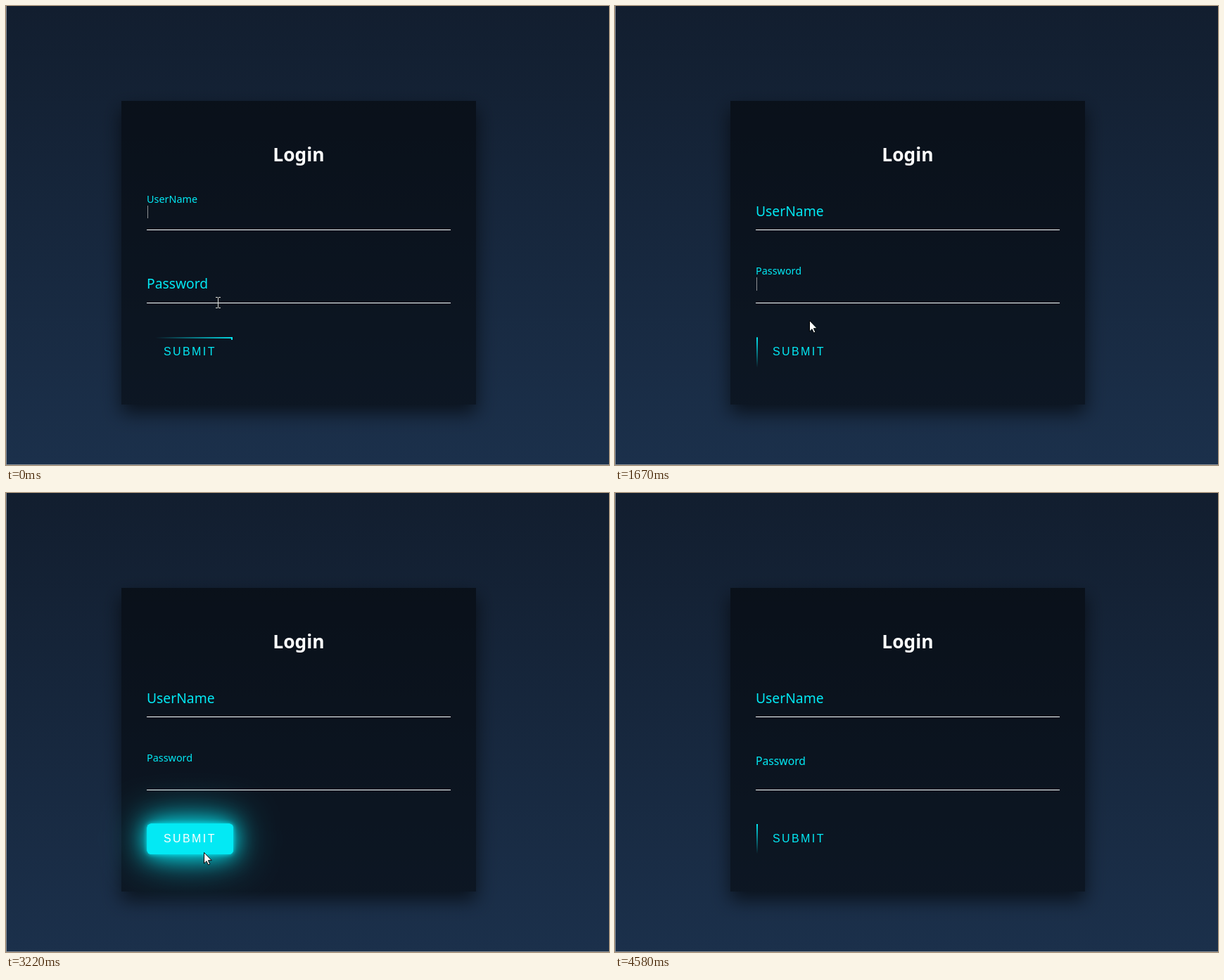
These frames come from a looping animation (857x653 px, 4.68 s). An HTML page with a canvas:

```html
<!DOCTYPE html>
<html lang="en">
<head>
<meta charset="utf-8">
<title>Login</title>
<style>
html, body { margin: 0; width: 100%; height: 100%; overflow: hidden; background: #121e2f; }
canvas { display: block; }
</style>
</head>
<body>
<canvas id="stage" width="857" height="653"></canvas>
<script>
const c = document.getElementById('stage').getContext('2d');
const LOOP = 4680, CYAN = '#03e9f4';
const BOX = [164, 135, 504, 432];
const BX = 201, BY = 471, BW = 121, BH = 43;

// The picture is refreshed only at these moments (ms).
const TICKS = [0, 120, 250, 400, 550, 690, 820, 970, 1120, 1270, 1400, 1550, 1670, 1820,
  1940, 2490, 3070, 3220, 3340, 3490, 3620, 3770, 3920, 4070, 4220, 4340, 4460, 4580];

// Pointer: [from, shape, x, y]
const POINTER = [
  [0, 'beam', 301, 422], [120, 'beam', 301, 416], [1670, 'arrow', 276, 447],
  [1820, 'arrow', 262, 508], [3220, 'arrow', 281, 511], [3340, 'arrow', 756, 563],
  [3770, 'arrow', 762, 592], [3920, 'arrow', 786, 639], [4070, 'none', 0, 0]
];

// Password caret: [on, off]
const BLINKS = [[400, 970], [1550, 1940], [2490, 3070], [3620, 4070]];

const clamp = v => Math.min(1, Math.max(0, v));

// cubic-bezier(.25, .1, .25, 1)
function ease(x) {
  let lo = 0, hi = 1, s;
  for (let i = 0; i < 24; i++) {
    s = (lo + hi) / 2;
    const bx = .75 * s * (1 - s) * (1 - s) + .75 * s * s * (1 - s) + s * s * s;
    if (bx < x) lo = s; else hi = s;
  }
  return .3 * s * (1 - s) * (1 - s) + 3 * s * s * (1 - s) + s * s * s;
}

const slide = (t, start) => ease(clamp((t - start) / 640));

function rect(color, x, y, w, h) {
  c.fillStyle = color;
  c.fillRect(x, y, w, h);
}

function text(str, font, color, x, y, spacing = 0) {
  c.font = font;
  c.fillStyle = color;
  c.letterSpacing = spacing + 'px';
  c.fillText(str, x, y);
}

function backdrop() {
  const g = c.createLinearGradient(0, 0, 0, 653);
  g.addColorStop(0, '#121e2f');
  g.addColorStop(1, '#1b304b');
  rect(g, 0, 0, 857, 653);

  c.save();
  c.beginPath();
  c.rect(0, 0, 857, 653);
  c.rect(...BOX);
  c.clip('evenodd');
  c.shadowColor = 'rgba(0,0,0,.6)';
  c.shadowBlur = 25;
  c.shadowOffsetY = 12;
  rect('#000', ...BOX);
  c.restore();
  rect('rgba(0,0,0,.5)', ...BOX);

  rect('#8b9097', 0, 0, 1, 653);
  rect('#8b9097', 0, 652, 857, 1);
}

// up: 0 = resting on the line, 1 = floating above it
function label(str, base, up) {
  text(str, `${19.3 - 4.9 * up}px "Noto Sans", "Open Sans", sans-serif`, CYAN, 200, base - 19.3 * up);
}

// One runner: a fading bar whose head moves from (x0, y0) along (dx, dy) past the button
function runner(phase, x0, y0, dx, dy) {
  const p = (phase % 1 + 1) % 1 * 2;
  if (p >= 1) return;
  const len = dx ? BW : BH, head = 2 * p * len, tail = head - len;
  const g = c.createLinearGradient(x0 + dx * tail, y0 + dy * tail, x0 + dx * head, y0 + dy * head);
  g.addColorStop(0, 'rgba(3,233,244,0)');
  g.addColorStop(1, CYAN);
  const a = Math.max(0, tail), b = Math.min(len, head), n = b - a;
  if (dx) rect(g, dx > 0 ? x0 + a : x0 - b, dx > 0 ? y0 : y0 - 2, n, 2);
  else rect(g, dy > 0 ? x0 - 2 : x0, dy > 0 ? y0 + a : y0 - b, 2, n);
}

function button(t) {
  const hover = t >= 1820 && t < 3340;
  if (hover) {
    c.save();
    c.shadowColor = c.fillStyle = CYAN;
    c.beginPath();
    c.roundRect(BX - .5, BY - .5, BW + 1.5, BH + .5, 6);
    for (const blur of [60, 30, 6]) {
      c.shadowBlur = blur;
      c.fill();
    }
    c.restore();
  } else {
    const phase = .273 + t * .001033;
    runner(phase, BX, BY, 1, 0);
    runner(phase - .25, BX + BW, BY, 0, 1);
    runner(phase - .5, BX + BW, BY + BH, -1, 0);
    runner(phase - .75, BX, BY + BH, 0, -1);
  }
  text('SUBMIT', '16px "Liberation Sans", Arial, sans-serif', hover ? '#fff' : CYAN, 224, 497, 2.4);
}

function pointer(t) {
  const [, shape, x, y] = POINTER.findLast(p => p[0] <= t);
  if (shape === 'beam') {
    const tone = '#dcdcd6';
    rect(tone, x, y - 7, 1, 14);
    for (const edge of [y - 8, y + 7]) {
      rect(tone, x - 3, edge, 3, 1);
      rect(tone, x + 1, edge, 3, 1);
    }
  } else if (shape === 'arrow') {
    c.save();
    c.translate(x + .5, y + .5);
    c.fill(arrow);
    c.lineWidth = 1;
    c.strokeStyle = '#000';
    c.fillStyle = '#fff';
    c.fill(arrow);
    c.stroke(arrow);
    c.restore();
  }
}
const arrow = new Path2D('M0 0V15.5L3.5 12.2 6 17.5 8.3 16.5 5.9 11.2H10.7Z');

function draw(t) {
  backdrop();
  c.textAlign = 'center';
  text('Login', 'bold 26.4px "Noto Sans", "Open Sans", sans-serif', '#fff', 416, 221);
  c.textAlign = 'left';

  const swap = slide(t, 390);
  label('UserName', 299, 1 - swap);
  label('Password', 401.5, swap - slide(t, 4460));
  rect('#fff', 200, 318, 432, 1);
  rect('#fff', 200, 422, 432, 1);

  if (t < 400) rect('#8f9194', 201, 284, 1, 18);
  if (BLINKS.some(([on, off]) => t >= on && t < off)) rect('#8f9194', 201, 386, 1, 19);

  button(t);
  pointer(t);
}

const begin = performance.now();
function frame() {
  const now = (performance.now() - begin) % LOOP;
  draw(TICKS.findLast(k => k <= now));
  requestAnimationFrame(frame);
}
frame();
</script>
</body>
</html>
```
